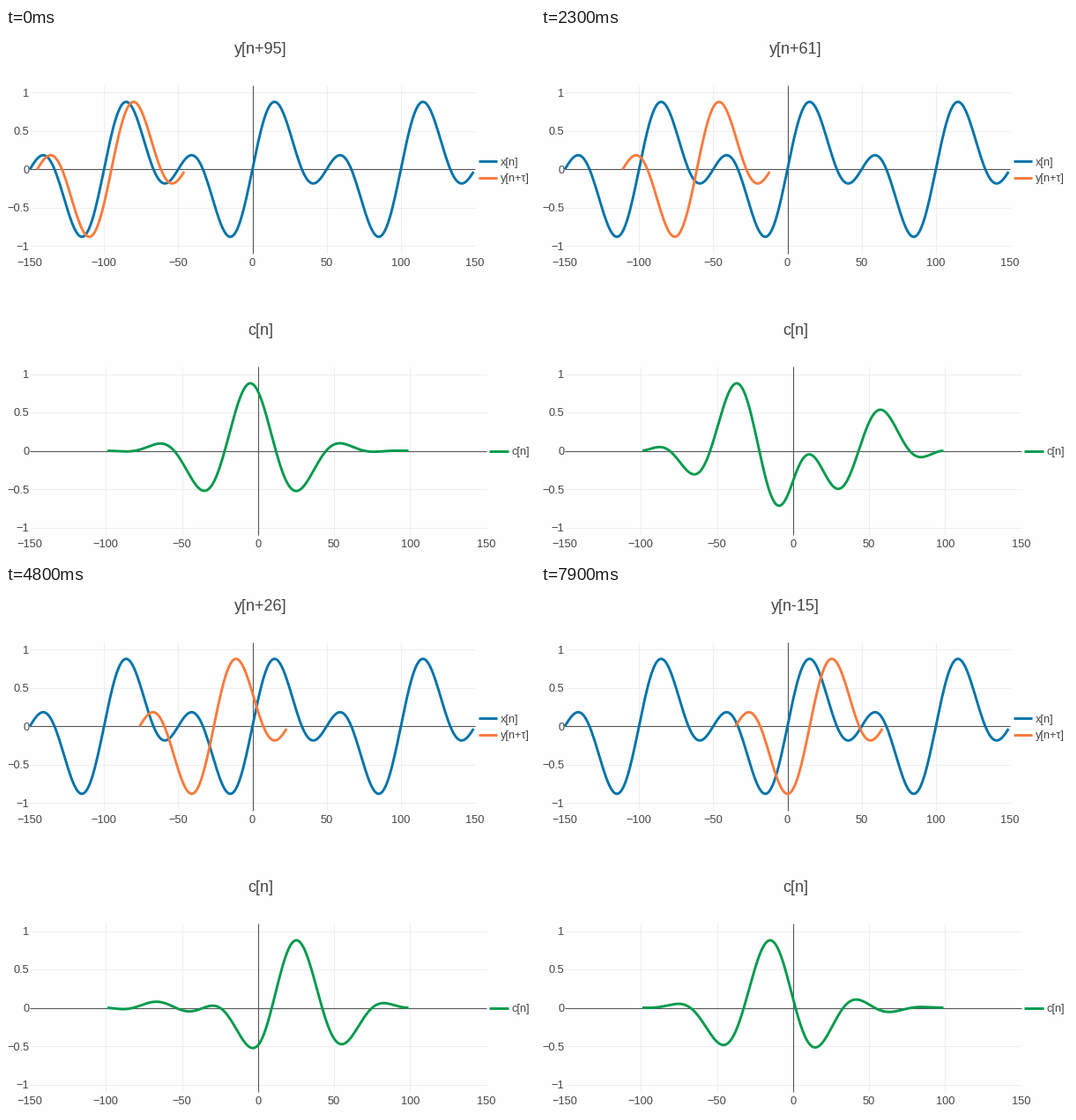
Animation, 600 px wide and 600 px high, one loop 8000 ms. Source, as a matplotlib script:

```python
import numpy as np
import matplotlib.pyplot as plt
from matplotlib.animation import FuncAnimation

FRAMES, INTERVAL = 80, 100
PT = 0.72  # points per pixel at 100 dpi
BLUE, ORANGE, GREEN = "#0073a9", "#f97a3c", "#009a4c"
INK, GRID, ZERO = "#444444", "#eeeef1", "#555555"

plt.rcParams["font.family"] = ["Liberation Sans", "DejaVu Sans"]

fig = plt.figure(figsize=(6, 6), dpi=100, facecolor="#fefefe")
ax = fig.add_axes([0, 0, 1, 1])
ax.set_xlim(0, 600)
ax.set_ylim(600, 0)
ax.axis("off")


def line(xs, ys, color, width, z=1):
    return ax.plot(xs, ys, color=color, lw=width * PT, zorder=z,
                   solid_capstyle="butt", solid_joinstyle="round")[0]


def label(x, y, s, size=12.7, ha="center"):
    return ax.text(x, y, s, fontsize=size * PT, color=INK, ha=ha,
                   va="baseline", zorder=5)


def number(v):
    return f"{v:g}".replace("-", "\u2212")


class Panel:
    """Plot area spanning -150..150 by -1.1..1.1, in stage pixels."""

    def __init__(self, right, mid):
        self.left, self.right, self.mid = 27, right, mid
        top, bottom = self.y(1.1), self.y(-1.1)
        for v in range(-150, 151, 50):
            x = self.x(v)
            if abs(v) < 150 and v:
                line([x, x], [top, bottom], GRID, 1, 0)
            label(x, mid + 109.7, number(v))
        for v in (-1, -0.5, 0, 0.5, 1):
            y = self.y(v)
            if v:
                line([self.left, right], [y, y], GRID, 1, 0)
            label(26.3, y + 4.5, number(v), ha="right")
        line([self.left, right], [mid, mid], ZERO, 1.1)
        line([self.x(0)] * 2, [top, bottom], ZERO, 1.1)

    def x(self, v):
        return self.left + (np.asarray(v) + 150) * (self.right - self.left) / 300

    def y(self, v):
        return self.mid - 87 * np.asarray(v)

    def trace(self, n, v, color, z):
        return line(self.x(n), self.y(v), color, 2.9, z)


def legend(x, y, color, name):
    line([x, x + 21.5], [y, y], color, 2.9, 4)
    label(x + 25, y + 4.8, name, ha="left")


def signal(n):
    t = 2 * np.pi * n / 100
    return 0.5 * (np.sin(t) + np.sin(2 * t))


def shift_at(i):
    tau = np.interp(i, [0, 14, 23, 36, 48, 62, 79], [95, 74, 61, 41, 26, 8, -15])
    return int(np.floor(tau + 0.5))


n_all = np.arange(-150, 150)
n_win = np.arange(-50, 50)
lags = np.arange(-99, 100)
x_all, y_win = signal(n_all), signal(n_win)

upper = Panel(532, 160.3)
lower = Panel(544.5, 479.5)
upper.trace(n_all, x_all, BLUE, 2)
shifted = upper.trace(n_win, y_win, ORANGE, 3)
corr = lower.trace(lags, 0 * lags, GREEN, 3)

legend(535.5, 151, BLUE, "x[n]")
legend(535.5, 169.5, ORANGE, "y[n+\u03c4]")
legend(548.3, 479.5, GREEN, "c[n]")
title = label(288.3, 29, "", 18)
label(288.3, 348.2, "c[n]", 18)


def update(i):
    tau = shift_at(i)
    c = np.correlate(signal(n_win - tau), y_win, "full")
    c *= x_all.max() / c.max()
    title.set_text(f"y[n{tau:+d}]")
    shifted.set_xdata(upper.x(n_win - tau))
    corr.set_ydata(lower.y(c))
    return title, shifted, corr


anim = FuncAnimation(fig, update, frames=FRAMES, interval=INTERVAL,
                     repeat=True, repeat_delay=0)
plt.show()
```
